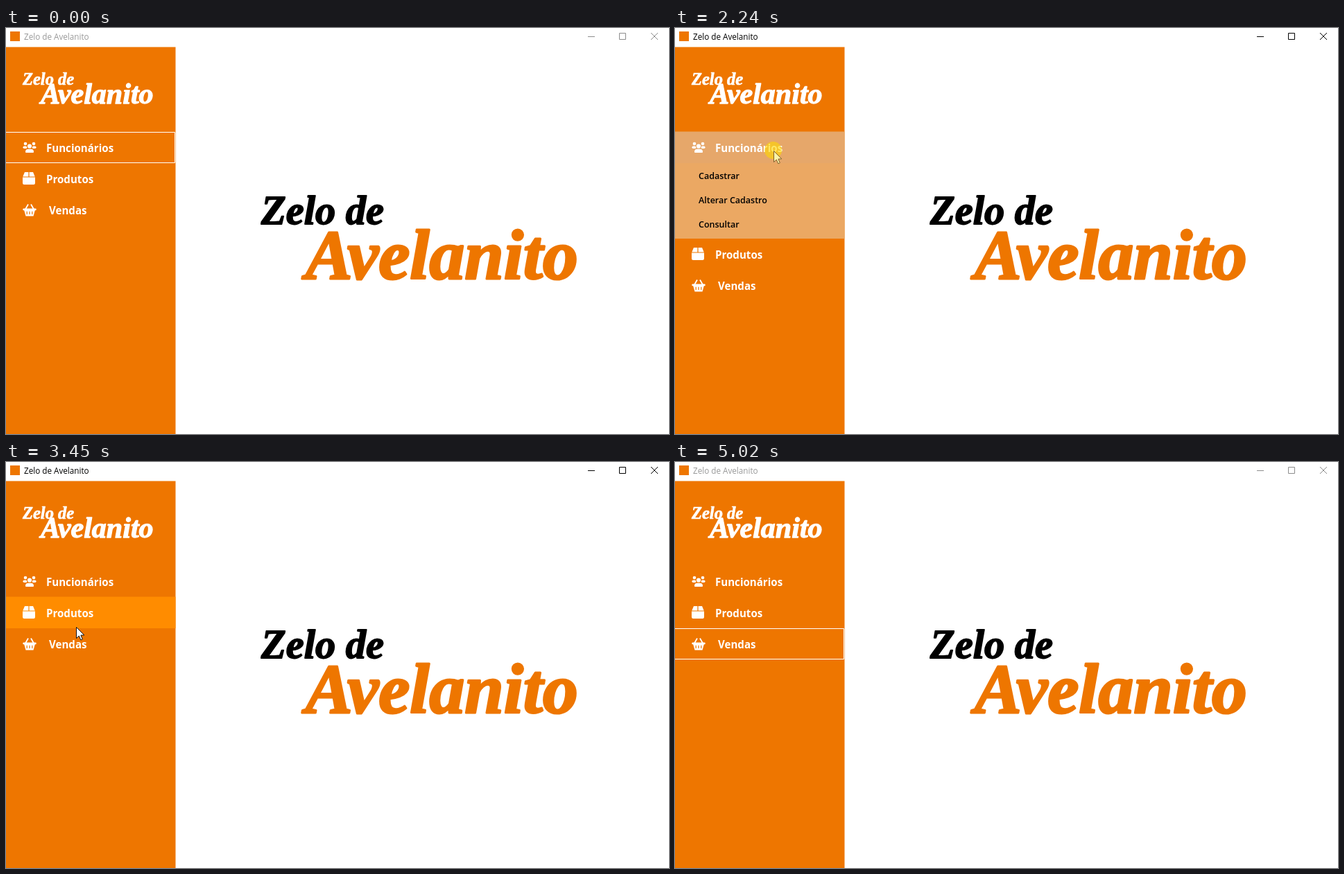
An HTML page with a canvas for the animation above (5.15 s loop, 956 by 586 pixels).

```html
<!DOCTYPE html>
<html lang="pt">
<head>
<meta charset="utf-8">
<title>Zelo de Avelanito</title>
<style>
  html, body { margin: 0; width: 100%; height: 100%; overflow: hidden; background: #fff; }
  canvas { display: block; }
</style>
</head>
<body>
<canvas id="stage" width="956" height="586"></canvas>
<script>
const ctx = document.getElementById('stage').getContext('2d');
const LOOP = 5150, STEP = 70, RELEASE = 130;
const MENU_TOP = 150, ROW = 45, ITEM = 35, SIDE = 244.5;
const ORANGE = '#ee7600', HOVER = '#ff8c00', PRESSED = '#e6a76a', PANEL = '#eba863';
const SANS = '"Open Sans", "Noto Sans", sans-serif';
const SERIF = '"Liberation Serif", "Times New Roman", serif';
const BRAND = ['Zelo de', 'Avelanito'];
const ACTIONS = ['Cadastrar', 'Alterar Cadastro', 'Consultar'];

// "show" and "hide" are the moments the row is clicked.
const MENU = [
  { label: 'Funcionários', x: 58, icon: usersIcon, show: 1040, hide: 2240, items: ACTIONS, pad: 4 },
  { label: 'Produtos', x: 58, icon: boxIcon, show: 2850, hide: 3320, items: ACTIONS, pad: 0 },
  { label: 'Vendas', x: 62, icon: basketIcon, show: 3870, hide: 4330, items: ['Cadastrar', 'Consultar'], pad: 0 }
];

// Turning points of the pointer; it moves evenly between them.
const PATH = [
  { t: 70, x: 836, y: 518 },
  { t: 550, x: 161, y: 133 },
  { t: 690, x: 142, y: 177 },
  { t: 2370, x: 142, y: 177 },
  { t: 2650, x: 101, y: 236 },
  { t: 2720, x: 103, y: 220 },
  { t: 3380, x: 103, y: 220 },
  { t: 3450, x: 101, y: 238 },
  { t: 3800, x: 92, y: 265 },
  { t: 4460, x: 92, y: 265 },
  { t: 4820, x: 1090, y: 653 }
];

const within = (t, a, b) => t >= a && t < b;
const isOpen = (row, t) => within(t, row.show + STEP, row.hide + RELEASE);
const isPressed = (row, t) =>
  within(t, row.show, row.show + STEP) || within(t, row.hide, row.hide + RELEASE);

function pointer(t) {
  const i = PATH.findIndex(p => p.t > t);
  if (i < 1) return null;
  const a = PATH[i - 1], b = PATH[i];
  const u = Math.floor((t - a.t) / STEP) * STEP / (b.t - a.t);
  return { x: Math.round(a.x + (b.x - a.x) * u), y: Math.round(a.y + (b.y - a.y) * u) };
}

function rect(x, y, w, h, color) {
  ctx.fillStyle = color;
  ctx.fillRect(x, y, w, h);
}

function round(x, y, w, h, radii, color) {
  ctx.fillStyle = color;
  ctx.beginPath();
  ctx.roundRect(x, y, w, h, radii);
  ctx.fill();
}

function disc(x, y, r, color) {
  ctx.fillStyle = color;
  ctx.beginPath();
  ctx.arc(x, y, r, 0, Math.PI * 2);
  ctx.fill();
}

function shape(points, color) {
  ctx.fillStyle = color;
  ctx.beginPath();
  points.forEach(([x, y]) => ctx.lineTo(x, y));
  ctx.closePath();
  ctx.fill();
}

function line(x0, y0, x1, y1, color, width = 1) {
  ctx.strokeStyle = color;
  ctx.lineWidth = width;
  ctx.beginPath();
  ctx.moveTo(x0, y0);
  ctx.lineTo(x1, y1);
  ctx.stroke();
}

function text(str, x, y, font, color) {
  ctx.font = font;
  ctx.fillStyle = color;
  ctx.fillText(str, x, y);
}

function brandText(str, x, y, size, color) {
  text(str, x, y, `italic bold ${size}px ${SERIF}`, color);
  ctx.strokeStyle = color;
  ctx.lineWidth = size * 0.03;
  ctx.lineJoin = 'round';
  ctx.strokeText(str, x, y);
}

// Icons are drawn around the origin; left and right halves mirror each other.
function usersIcon(bg) {
  for (const side of [-1, 1]) {
    disc(side * 6, -6.5, 2.3, '#fff');
    round(side * 6.5 - 3, -3, 6, 3.5, 2, '#fff');
  }
  disc(0, -3, 4.2, bg);
  disc(0, -3, 3.1, '#fff');
  round(-6, 1.2, 12, 5.3, [4, 4, 1, 1], '#fff');
}

function boxIcon() {
  for (const side of [-1, 1]) {
    const lid = [[0.6, -10.5], [6, -10.5], [8.7, -4], [0.6, -4]];
    shape(lid.map(([x, y]) => [x * side - 1, y]), '#fff');
  }
  round(-10, -3, 18, 10.5, [0, 0, 2.2, 2.2], '#fff');
}

function basketIcon(bg) {
  for (const side of [-1, 1]) line(side * 6, -2, side * 2, -9, '#fff', 1.8);
  round(-9.7, -3, 19.4, 2.8, 1.2, '#fff');
  shape([[-8, -1], [8, -1], [5.5, 8], [-5.5, 8]], '#fff');
  for (const x of [-3.8, 0, 3.8]) line(x, 1.2, x, 5.5, bg, 1.2);
}

function titleBar(active) {
  const ink = active ? '#000' : '#8c8c8c';
  rect(6, 5, 14, 14, ORANGE);
  text(BRAND.join(' '), 26, 17, `11.7px ${SANS}`, active ? '#000' : '#999');
  line(839, 12.5, 849, 12.5, ink);
  ctx.strokeRect(884.5, 7.5, 9, 9);
  line(930, 7, 940, 17, ink);
  line(940, 7, 930, 17, ink);
}

function menuRow(row, top, bg, focused) {
  const mid = top + 23.5;
  if (bg !== ORANGE) rect(0, top - 0.5, SIDE, ROW + 0.5, bg);
  if (focused) {
    ctx.strokeStyle = '#fff';
    ctx.lineWidth = 1;
    ctx.strokeRect(-1.5, top + 0.5, 245, ROW - 1);
  }
  ctx.save();
  ctx.translate(34, mid);
  row.icon(bg);
  ctx.restore();
  text(row.label, row.x, mid + 5.5, `bold 15.1px ${SANS}`, '#fff');
}

function subMenu(row, top) {
  const height = row.items.length * ITEM + row.pad;
  rect(0, top, SIDE, height, PANEL);
  row.items.forEach((item, n) =>
    text(item, 34, top + 23 + ITEM * n, `600 12.5px ${SANS}`, '#000'));
  return height;
}

function sidebar(t, mouse, pressing) {
  rect(0, 27.5, SIDE, 558.5, ORANGE);
  brandText(BRAND[0], 24, 82, 24.5, '#fff');
  brandText(BRAND[1], 50, 109, 42, '#fff');

  const focus = t < MENU[0].show ? MENU[0] : t >= 5020 ? MENU[2] : null;
  let top = MENU_TOP;
  for (const row of MENU) {
    const over = mouse && mouse.x < SIDE && within(mouse.y, top, top + ROW);
    menuRow(row, top, !over ? ORANGE : pressing ? PRESSED : HOVER, row === focus);
    top += ROW;
    if (isOpen(row, t)) top += subMenu(row, top);
  }
}

function arrow({ x, y }, soft) {
  ctx.save();
  ctx.translate(x + 0.5, y + 0.5);
  shape([[0, 0], [0, 16], [3.8, 12.5], [6.3, 18.3], [8.8, 17.2], [6.4, 11.6], [11.3, 11.4]],
    soft ? '#fdf3a8' : '#fff');
  ctx.strokeStyle = soft ? '#80602c' : '#111';
  ctx.lineWidth = 1;
  ctx.lineJoin = 'miter';
  ctx.stroke();
  ctx.restore();
}

function draw(t) {
  rect(0, 0, 956, 586, '#fff');
  const mouse = pointer(t);
  const pressing = MENU.some(row => isPressed(row, t));
  titleBar(within(t, 830, 5020));
  sidebar(t, mouse, pressing);
  brandText(BRAND[0], 368, 283, 58.5, '#000');
  brandText(BRAND[1], 432, 362, 101.5, ORANGE);
  if (!mouse) return;
  if (pressing || within(t, 830, 1040)) {
    disc(mouse.x - 0.5, mouse.y - 0.5, 12.5, 'rgba(255, 215, 0, 0.6)');
  }
  arrow(mouse, pressing);
}

const began = performance.now();
function tick() {
  draw((performance.now() - began) % LOOP);
  requestAnimationFrame(tick);
}
tick();
</script>
</body>
</html>
```
